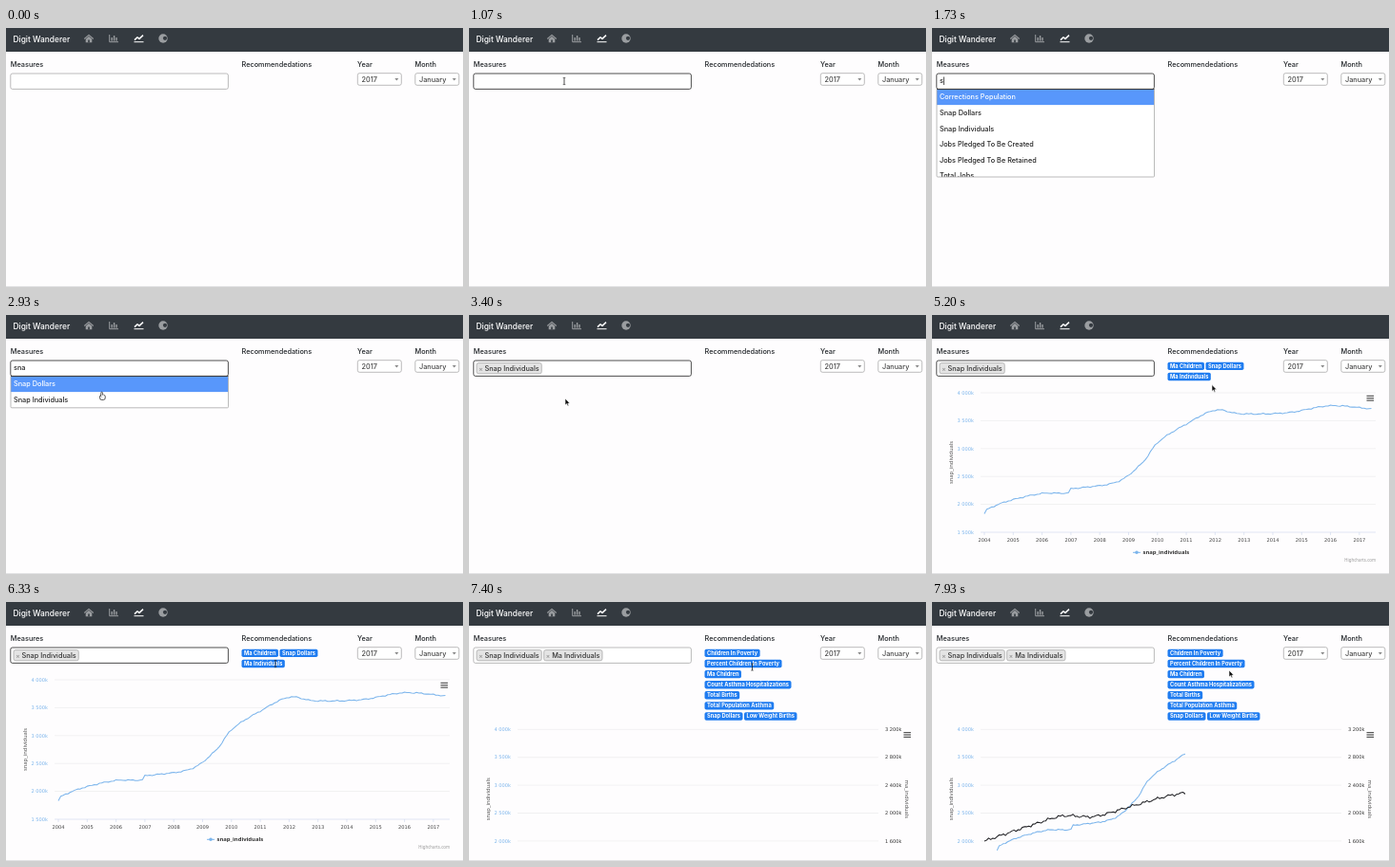
Animation, 480 px wide and 273 px high, one loop 8 s. Source, as an HTML page with a canvas:

```html
<!DOCTYPE html>
<html lang="en">
<head>
<meta charset="utf-8">
<title>Measures dashboard</title>
<style>
html, body { margin: 0; width: 100%; height: 100%; overflow: hidden; background: #fefdfe; }
canvas { display: block; width: 480px; height: 273px; }
</style>
</head>
<body>
<canvas id="stage"></canvas>
<script>
const W = 480, H = 273, LOOP = 8000;
const canvas = document.getElementById('stage');
const ctx = canvas.getContext('2d');
const dpr = window.devicePixelRatio || 1;
canvas.width = W * dpr;
canvas.height = H * dpr;

const UI = 'Inter, sans-serif';
const CHART = '"Noto Sans", sans-serif';
const AXIS = '"DejaVu Sans", sans-serif';
const BLUE = '#7cb5ec', INK = '#212529';

// Key moments in ms
const FOCUS = 1070, CARET = 1200, TYPE_S = 1670, TYPE_N = 2070, TYPE_A = 2330;
const PICK = 3400, CHART_1 = 3738, ADD = 6600, CHART_2 = 7387;

const OPTIONS = ['Corrections Population', 'Snap Dollars', 'Snap Individuals',
  'Jobs Pledged To Be Created', 'Jobs Pledged To Be Retained', 'Total Jobs'];
const BADGES_1 = [['Ma Children', 'Snap Dollars'], ['Ma Individuals']];
const BADGES_2 = [['Children In Poverty'], ['Percent Children In Poverty'], ['Ma Children'],
  ['Count Asthma Hospitalizations'], ['Total Births'], ['Total Population Asthma'],
  ['Snap Dollars', 'Low Weight Births']];

// Turning points: month since January 2004, thousands of people
const LAST_MONTH = 161, HOVER_MONTH = 40;
const SNAP = curve([[0, 1830], [1, 1905], [10, 2061], [24, 2195], [35, 2209], [36, 2277],
  [HOVER_MONTH, 2294.076], [56, 2418], [66, 2758], [72, 3104], [84, 3439], [96, 3689],
  [106, 3625], [126, 3643], [144, 3768], [161, 3711]], 1);
const MA = curve([[-6, 1599], [18, 1843], [31, 1959], [46, 1952], [64, 2102], [84, 2265], [114, 2388]], 1.8);

// Pointer moves: start, end, x, y
const HOME = [215, 256];
const MOVES = [[70, 670, 100, 56], [2530, 3100, 101, 88], [3700, 5100, 294, 73.5],
  [5500, 6200, 283, 65], [7000, 7800, 312, 72]];

const clamp = v => Math.max(0, Math.min(1, v));
const sine = v => (1 - Math.cos(Math.PI * clamp(v))) / 2;

// Smooth curve through the keys with a small monthly wobble
function curve(keys, wobble) {
  const slope = i => {
    const a = keys[Math.max(0, i - 1)], b = keys[Math.min(keys.length - 1, i + 1)];
    return (b[1] - a[1]) / (b[0] - a[0]);
  };
  const at = m => {
    const i = Math.max(1, keys.findIndex(k => k[0] >= m));
    const [m0, v0] = keys[i - 1], [m1, v1] = keys[i];
    const d = m1 - m0, u = (m - m0) / d, r = 1 - u;
    const base = r * r * (1 + 2 * u) * v0 + u * u * (3 - 2 * u) * v1
      + u * r * d * (r * slope(i - 1) - u * slope(i));
    return base + wobble * (7 * Math.sin(0.35 * Math.PI * m) + 6 * Math.sin(0.85 * Math.PI * m));
  };
  return { first: keys[0][0], last: keys[keys.length - 1][0], at };
}

function text(str, x, y, size, color, font = UI, weight = 500, align = 'left') {
  ctx.font = `${weight} ${size}px ${font}`;
  ctx.textAlign = align;
  ctx.textBaseline = 'middle';
  ctx.fillStyle = color;
  ctx.fillText(str, x, y);
  return ctx.measureText(str).width;
}

function textWidth(str, size, weight) {
  ctx.font = `${weight} ${size}px ${UI}`;
  return ctx.measureText(str).width;
}

function rect(x, y, w, h, color) {
  ctx.fillStyle = color;
  ctx.fillRect(x, y, w, h);
}

function paint(fill, stroke, width) {
  if (fill) { ctx.fillStyle = fill; ctx.fill(); }
  if (stroke) { ctx.strokeStyle = stroke; ctx.lineWidth = width; ctx.stroke(); }
}

function box(x, y, w, h, r, fill, stroke, width = 0.8) {
  ctx.beginPath();
  ctx.roundRect(x, y, w, h, r);
  paint(fill, stroke, width);
}

function line(points, color, width) {
  ctx.beginPath();
  ctx.lineJoin = 'round';
  points.forEach(([x, y]) => ctx.lineTo(x, y));
  paint(null, color, width);
}

function shape(points, fill, stroke, width = 0.7) {
  ctx.beginPath();
  points.forEach(([x, y]) => ctx.lineTo(x, y));
  ctx.closePath();
  paint(fill, stroke, width);
}

function disc(x, y, r, color) {
  ctx.beginPath();
  ctx.arc(x, y, r, 0, 7);
  paint(color);
}

function drawNav() {
  const gray = '#9a9da0', dark = '#343a40';
  rect(0, 0, W, 25, dark);
  text('Digit Wanderer', 7.5, 12.8, 8.4, '#fff');

  line([[82.3, 11.5], [87, 7.3], [91.7, 11.5]], gray, 1.1);
  shape([[87, 8.8], [90.3, 11.8], [90.3, 15.2], [83.7, 15.2], [83.7, 11.8]], gray);
  rect(86.2, 12.5, 1.6, 2.7, dark);

  line([[108.7, 7], [108.7, 14.7], [118, 14.7]], gray, 1);
  for (let i = 0; i < 3; i++) rect(110.5 + i * 2.4, 10 - i % 2 * 2, 1.4, 3.6 + i % 2 * 2, gray);

  line([[134.5, 14.7], [144.5, 14.7]], '#fff', 1);
  line([[135, 12.6], [138, 9.7], [140, 11.4], [144, 7.6]], '#fff', 1.5);

  disc(165, 11, 4.7, gray);
  disc(167, 10.8, 2.1, dark);
}

function drawSelect(label, value, x) {
  text(label, x, 38.8, 7.3, INK);
  box(x + 0.3, 47.7, 46, 12.6, 2, '#fff', '#aaa');
  text(value, x + 4.5, 54.6, 7.3, '#444');
  shape([[x + 39.3, 53], [x + 43.3, 53], [x + 41.3, 55.6]], '#888');
}

function drawChip(label, x) {
  const w = textWidth(label, 7.3, 500) + 11;
  box(x, 50.6, w, 11.2, 2, '#e4e4e4', '#aaa');
  text('×', x + 2.2, 56.7, 6.6, '#999', UI, 600);
  text(label, x + 8.5, 56.6, 7.3, '#333');
  return x + w + 2.4;
}

function drawField(t) {
  const focused = t >= FOCUS && t < ADD;
  box(4.8, 48, 228.6, 16.4, 2, '#fff', focused ? '#222' : '#aaa', 0.8);
  if (t >= PICK) {
    const next = drawChip('Snap Individuals', 8);
    if (t >= ADD) drawChip('Ma Individuals', next);
    return;
  }
  const keys = [TYPE_S, TYPE_N, TYPE_A].filter(k => t >= k);
  const w = text('sna'.slice(0, keys.length), 8, 56.2, 7.3, '#222');
  const since = t - (keys.pop() ?? CARET);
  if (since >= 0 && Math.floor(since / 530) % 2 === 0) rect(8.3 + w, 51.5, 0.7, 8.5, '#111');
}

function drawMenu(t) {
  if (t < TYPE_S || t >= PICK) return;
  const full = t < TYPE_N;
  const items = full ? OPTIONS : OPTIONS.slice(1, 3);
  const active = !full && pointer(t)[1] > 83 ? 1 : 0;
  const h = full ? 92.5 : 33.3;
  ctx.save();
  box(5, 64.5, 228.5, h, 1, '#fff');
  ctx.clip();
  items.forEach((name, i) => {
    const y = 64.7 + i * 16.6;
    if (i === active) rect(5, y, 228.5, 16.4, '#5897fb');
    text(name, 8, y + 8.5, 7.3, i === active ? '#fff' : '#222');
  });
  ctx.restore();
  box(5, 64.5, 228.5, h, 1, null, '#aaa');
  line([[5, 64.5], [233.5, 64.5]], '#222', 0.8);
}

function drawBadges(rows) {
  rows.forEach((row, i) => {
    let x = 247.5;
    const y = 49.7 + i * 11.1;
    row.forEach(name => {
      const w = textWidth(name, 5.7, 700) + 5;
      box(x, y, w, 8.4, 1.8, '#1f7cf0');
      text(name, x + 2.5, y + 4.4, 5.7, '#fff', UI, 700);
      x += w + 1.5;
    });
  });
}

function vertical(str, x, y, angle) {
  ctx.save();
  ctx.translate(x, y);
  ctx.rotate(angle);
  text(str, 0, 0, 5.8, '#555', CHART, 400, 'center');
  ctx.restore();
}

const thousands = v => `${Math.floor(v / 1000)} ${String(v % 1000).padStart(3, '0')}k`;

function drawAxes({ top, right, dual }) {
  for (let i = 0; i < 6; i++) {
    const y = top + i * 29.4;
    line([[51, y], [right, y]], i === 5 ? '#ccd6eb' : '#e8e8ea', 0.6);
    text(thousands(4000 - i * 500), 44, y + 0.4, 5.1, BLUE, AXIS, 400, 'right');
    if (dual) text(thousands(3200 - i * 400), right + 7, y + 0.4, 5.1, '#333', AXIS, 400);
  }
  vertical('snap_individuals', 20, top + 73.5, -Math.PI / 2);
  if (dual) vertical('ma_individuals', 460, top + 73.5, Math.PI / 2);
  for (let i = 0; i < 3; i++) rect(456.5, top + 2.7 + i * 2.4, 7.6, 1.2, '#555');
}

// A plot maps months and values to the stage
function makePlot(top, right, firstMonth, dual) {
  const step = (right - 59.5) / (LAST_MONTH - firstMonth);
  return {
    top, right, dual, step,
    x: m => 55 + (m - firstMonth) * step,
    y: (v, max = 4000, tick = 500) => top + (max - v) / tick * 29.4,
  };
}
const SINGLE = makePlot(82, 466, 0, false);
const DUAL = makePlot(134.3, 430, -6, true);

function drawSeries(plot, series, color, max, tick) {
  const points = [];
  for (let m = series.first; m <= series.last; m++) points.push([plot.x(m), plot.y(series.at(m), max, tick)]);
  line(points, color, 1.05);
}

function reveal(start, t, right, draw) {
  ctx.save();
  ctx.beginPath();
  ctx.rect(51, 0, (right - 51) * sine((t - start) / 1000), H);
  ctx.clip();
  draw();
  ctx.restore();
}

function drawTooltip(t) {
  if (t < 4050 || t > 4950) return;
  const month = Math.min(HOVER_MONTH, Math.floor((pointer(t)[0] - 55) / SINGLE.step));
  const value = SNAP.at(month);
  const x = SINGLE.x(month), y = SINGLE.y(value);
  const cx = x - 16 * (1 - sine((t - 4270) / 200));
  const date = new Date(Date.UTC(2004, month, 1));
  const part = options => date.toLocaleDateString('en-US', { ...options, timeZone: 'UTC' });
  ctx.save();
  ctx.globalAlpha = 1 - clamp((t - 4700) / 250);
  line([[x, 82], [x, 229]], '#ccccd0', 0.7);
  disc(x, y, 4.5, 'rgba(124,181,236,.4)');
  disc(x, y, 2.6, '#fff');
  disc(x, y, 2.1, BLUE);
  const left = cx - 43, right = cx + 43, top = y - 26.3, bottom = y - 4.3;
  shape([[left, top], [right, top], [right, bottom], [cx + 3, bottom], [cx, bottom + 3],
    [cx - 3, bottom], [left, bottom]], 'rgba(247,247,247,.88)', '#7f9fc0', 0.7);
  text(`${part({ weekday: 'long' })}, ${part({ month: 'short' })} 1, 05:00`, left + 3, top + 7.4, 5, '#333', CHART, 400);
  const w = text('snap_individuals: ', left + 3, top + 14.5, 5.7, BLUE, CHART, 400);
  text(Math.round(value * 1000).toFixed(1), left + 3 + w, top + 14.5, 5.9, '#222', CHART, 700);
  ctx.restore();
}

function drawSingle(t) {
  drawAxes(SINGLE);
  for (let i = 0; i < 14; i++) {
    const x = SINGLE.x(i * 12);
    line([[x, 229], [x, 232]], '#ccd6eb', 0.6);
    text(String(2004 + i), x, 237.4, 5.1, '#444', AXIS, 400, 'center');
  }
  reveal(CHART_1, t, SINGLE.right, () => drawSeries(SINGLE, SNAP, BLUE));
  line([[211, 250.3], [219, 250.3]], BLUE, 1);
  disc(215, 250.3, 1.8, BLUE);
  text('snap_individuals', 221.5, 250.2, 5.9, '#333', CHART, 700);
  text('Highcharts.com', 466, 258.7, 4.4, '#999', CHART, 400, 'right');
  drawTooltip(t);
}

function drawDual(t) {
  drawAxes(DUAL);
  reveal(CHART_2, t, DUAL.right, () => {
    drawSeries(DUAL, SNAP, BLUE);
    drawSeries(DUAL, MA, '#222226', 3200, 400);
  });
}

function pointer(t) {
  let [x, y] = HOME;
  for (const [start, end, tx, ty] of MOVES) {
    const k = sine((t - start) / (end - start));
    x += (tx - x) * k;
    y += (ty - y) * k;
  }
  return [x, y];
}

function drawPointer(t) {
  if (t < 70 || (t >= TYPE_S && t < 2530)) return;
  const [x, y] = pointer(t);
  const overField = t < PICK && y > 47 && y < 65;
  const overBadge = t > 5500 && y < 69;
  ctx.save();
  ctx.translate(x, y);
  if (overField || overBadge) {
    line([[0, -3.5], [0, 3.5]], '#222', 0.8);
    for (const end of [-3.6, 3.6]) line([[-1.3, end], [1.3, end]], '#222', 0.6);
  } else if (t > 2530 && t < PICK) {
    box(-2.2, 2.7, 5.6, 5.2, 1.8, '#fff', '#222');
    box(-1, -0.3, 1.6, 5, 0.8, '#fff', '#222', 0.7);
    rect(-0.6, 3, 3, 2, '#fff');
  } else {
    shape([[0, 0], [0, 7], [1.6, 5.6], [2.7, 8], [3.8, 7.5], [2.8, 5.2], [4.9, 5]], '#111', '#fff', 0.6);
  }
  ctx.restore();
}

function render(t) {
  ctx.setTransform(dpr, 0, 0, dpr, 0, 0);
  rect(0, 0, W, H, '#fefdfe');
  rect(0, 272, W, 1, '#e3e3e5');
  drawNav();
  text('Measures', 4.8, 38.8, 7.3, INK);
  text('Recommendedations', 247.5, 38.8, 7.3, INK);
  drawSelect('Year', '2017', 369);
  drawSelect('Month', 'January', 429.5);
  drawField(t);
  if (t >= CHART_2) {
    drawBadges(BADGES_2);
    drawDual(t);
  } else if (t >= CHART_1) {
    drawBadges(BADGES_1);
    drawSingle(t);
  }
  drawMenu(t);
  drawPointer(t);
}

let begin;
function tick(now) {
  begin ??= now;
  render((now - begin) % LOOP);
  requestAnimationFrame(tick);
}
render(0);
requestAnimationFrame(tick);
</script>
</body>
</html>
```
